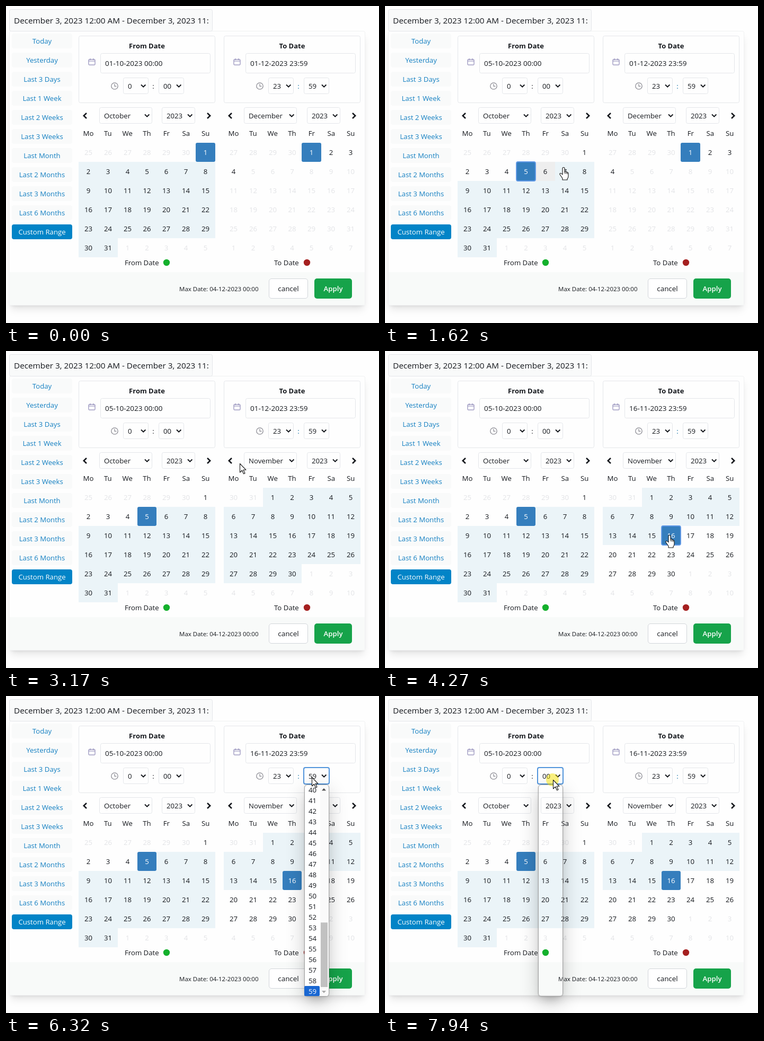
Animation, 704 px wide and 598 px high, one loop 8000 ms. Source, as an HTML page:

```html
<!DOCTYPE html>
<html lang="en">
<head>
<meta charset="utf-8">
<title>Date range picker</title>
<style>
  html, body { margin: 0; width: 100%; height: 100%; overflow: hidden; background: #fefefe; }
  svg, div { position: absolute; box-sizing: border-box; }
  svg { left: 0; top: 0; }
  text { font-family: "Open Sans", "Noto Sans", sans-serif; white-space: pre; }
  #panel {
    left: 6px; top: 47px; width: 672px; height: 518px; background: #fefefe;
    border: 1px solid #f1f2f3; border-radius: 3px;
    box-shadow: 0 10px 15px -3px rgba(0,0,0,.1), 0 4px 6px -4px rgba(0,0,0,.12);
  }
  #menu {
    top: 167px; width: 47px; height: 400px; border: 1px solid #a5a5a5; border-radius: 6px;
    box-shadow: 0 12px 36px rgba(0,0,0,.2), 0 12px 18px -8px rgba(0,0,0,.16), 0 0 2px rgba(0,0,0,.25);
  }
</style>
</head>
<body>
<div id="panel"></div>
<svg id="app" width="704" height="598"></svg>
<div id="menu"></div>
<svg id="overlay" width="704" height="598"></svg>
<script>
const LOOP = 8000, STEP = 77, CELL = 258 / 7, RIGHT = 274;
const INK = '#15181d', LINE = '#e4e6ea', BLUE = '#0284c7';
const OCT = 9, NOV = 10, DEC = 11;
const day = (month, date) => Date.UTC(2023, month, date) / 864e5;
const MAX_DAY = day(DEC, 4);
const pad = n => String(n).padStart(2, '0');

// Pointer moves: start, end, number of steps, evenly timed path points.
const moves = [
  [310, 847, 8, [[646, 270], [520, 285], [390, 300], [300, 312], [274, 313]]],
  [1620, 2470, 12, [[337, 304], [420, 262], [497, 225], [480, 212], [431, 205]]],
  [3170, 3720, 8, [[441, 212], [470, 250], [510, 310], [532, 340], [537, 347]]],
  [4820, 5610, 11, [[538, 335], [545, 270], [560, 190], [573, 150], [575, 158]]],
  [6320, 6780, 7, [[577, 153], [550, 161], [524, 154], [518, 152]]],
  [7480, 7863, 6, [[500, 153], [410, 160], [335, 161], [317, 158]]]
];
// Click highlights: start, end.
const clicks = [[923, 1000], [2620, 2700], [4040, 4193], [5680, 5750], [6920, 7010], [7940, LOOP]];

function pointerAt(t) {
  const move = moves.filter(m => m[0] <= t).pop();
  if (!move) return null;
  const [start, end, steps, path] = move;
  const step = Math.min(steps - 1, Math.floor((t - start) / (end - start) * (steps - 1) + 1e-6));
  const u = step / (steps - 1) * (path.length - 1);
  const i = Math.min(path.length - 2, Math.floor(u));
  return path[i].map((v, k) => v + (path[i + 1][k] - v) * (u - i));
}

function stateAt(t) {
  return {
    from: day(OCT, t < 923 ? 1 : 5),
    to: t < 4040 ? day(DEC, 1) : day(NOV, 16),
    rightMonth: t < 2620 ? DEC : NOV,
    focus: t >= 923 && t < 2620 ? day(OCT, 5) : t >= 4040 && t < 5680 ? day(NOV, 16) : 0,
    menu: t < 5680 ? null
      : t < 6920 ? { x: 562, count: 60, blank: t < 5750 }
      : t < 7940 ? { x: 495, count: 24 }
      : { x: 288, count: 60, blank: true }
  };
}

const rect = (x, y, w, h, fill, r = 0, more = '') =>
  `<rect x="${x}" y="${y}" width="${w}" height="${h}" rx="${r}" fill="${fill}" ${more}/>`;
const frame = (x, y, w, h, fill = '#fefefe', stroke = LINE) =>
  rect(x + .5, y + .5, w - 1, h - 1, fill, 3, `stroke="${stroke}"`);
const text = (s, x, y, { size = 13.2, fill = INK, weight = 400, anchor = 'start' } = {}) =>
  `<text x="${x}" y="${y}" font-size="${size}" fill="${fill}" font-weight="${weight}" text-anchor="${anchor}">${s}</text>`;
const centered = (s, x, y, style) => text(s, x, y, { ...style, anchor: 'middle' });
const line = (d, stroke = INK, width = 2) =>
  `<path d="${d}" fill="none" stroke="${stroke}" stroke-width="${width}"/>`;
const dot = (x, y, r, fill) => `<circle cx="${x}" cy="${y}" r="${r}" fill="${fill}"/>`;

const select = (x, y, w, label) =>
  frame(x, y, w, 31) + text(label, x + 9, y + 21) + line(`M${x + w - 14} ${y + 13.5}l4.2 4.2 4.2-4.2`);

function dateBox(x, title, value, hour, minute, colon) {
  return frame(x, 56, 258, 127) +
    centered(title, x + 129, 80, { size: 13, weight: 700 }) +
    `<rect x="${x + 19}" y="100.8" width="12" height="10.4" rx="1.5" fill="none" stroke="#8f8ab8" stroke-width="1.2"/>` +
    line(`M${x + 19} 104h12M${x + 22} 99v3M${x + 28} 99v3`, '#8f8ab8', 1.2) +
    frame(x + 41, 89, 208, 38) + text(value, x + 50, 113, { size: 13.5 }) +
    `<circle cx="${x + 68}" cy="151" r="6.2" fill="none" stroke="#8b8b93" stroke-width="1.3"/>` +
    line(`M${x + 68} 147v4.3h3.5`, '#8b8b93', 1.2) +
    select(x + 84, 135, 48, hour) + centered(':', x + 141, 156, { fill: colon }) +
    select(x + 151, 135, 48, minute);
}

function calendar(x, monthX, month, state, hover) {
  const names = { [OCT]: 'October', [NOV]: 'November', [DEC]: 'December' };
  let out = line(`M${x + 15} 202l-5.2 5 5.2 5`, INK, 2.6) + line(`M${x + 243} 202l5.2 5-5.2 5`, INK, 2.6) +
    select(monthX, 191, 100, names[month]) + select(x + 157, 191, 63, 2023);
  ['Mo', 'Tu', 'We', 'Th', 'Fr', 'Sa', 'Su'].forEach((s, i) => out += centered(s, x + CELL * (i + .5), 245));

  let ring = '';
  eachDay(x, month, ({ n, date, left, top, width, enabled, inMonth }) => {
    const active = inMonth && (n === state.from || n === state.to);
    const over = hover && enabled && inside(hover, left, top, width, 36);
    const inRange = inMonth && n >= state.from && n <= state.to;
    const fill = active ? '#357ebd' : over ? '#eeeeee' : inRange ? '#ebf4f8' : '';
    if (fill) out += rect(left, top, width, 36, fill, active ? 3 : 0);
    if (active && n === state.focus)
      ring = rect(left, top, width, 36, 'none', 3, 'stroke="#5f98e6" stroke-width="1.8"');
    out += centered(date, left + width / 2, top + 23, { fill: active ? '#fff' : enabled ? INK : '#e2e3e6' });
  });
  return out + ring;
}

const inside = ([px, py], x, y, w, h) => px >= x && px < x + w && py >= y && py < y + h;

function eachDay(x, month, visit) {
  const first = new Date(Date.UTC(2023, month, 1));
  const start = day(month, 1) - (first.getUTCDay() + 6) % 7;
  for (let i = 0; i < 42; i++) {
    const n = start + i, d = new Date(n * 864e5), inMonth = d.getUTCMonth() === month;
    const left = Math.round(x + i % 7 * CELL);
    visit({
      n, inMonth, date: d.getUTCDate(), enabled: inMonth && n <= MAX_DAY,
      left, width: Math.round(x + (i % 7 + 1) * CELL) - left, top: 258 + 36 * Math.floor(i / 7)
    });
  }
}

function presets() {
  const labels = ['Today', 'Yesterday', 'Last 3 Days', 'Last 1 Week', 'Last 2 Weeks', 'Last 3 Weeks',
    'Last Month', 'Last 2 Months', 'Last 3 Months', 'Last 6 Months', 'Custom Range'];
  return labels.map((label, i) => {
    const chosen = label === 'Custom Range';
    return rect(11, 52 + 36 * i, 114, 28, chosen ? BLUE : '#f9fafa', 4) +
      centered(label, 68, 71 + 36 * i, { fill: chosen ? '#fff' : '#1580c2' });
  }).join('');
}

function format(n, time) {
  const d = new Date(n * 864e5);
  return `${pad(d.getUTCDate())}-${pad(d.getUTCMonth() + 1)}-2023 ${time}`;
}

function drawApp(state, hover) {
  return frame(6, 6, 384, 42, '#f9fafa') +
    text('December 3, 2023 12:00 AM - December 3, 2023 11:', 15, 33, { size: 15.3 }) +
    presets() +
    dateBox(137, 'From Date', format(state.from, '00:00'), '0', '00', INK) +
    dateBox(137 + RIGHT, 'To Date', format(state.to, '23:59'), '23', '59', '#0369a1') +
    calendar(137, 176, OCT, state, hover) +
    calendar(137 + RIGHT, 449, state.rightMonth, state, hover) +
    text('From Date', 224, 489) + dot(303, 484, 6.2, '#14b02c') +
    text('To Date', 506, 489) + dot(568, 484, 6.2, '#a52020') +
    rect(7, 502, 670, 62, '#f8faf9') +
    text('Max Date: 04-12-2023 00:00', 327, 538, { size: 11.5 }) +
    rect(496.5, 514.5, 73, 37, '#fff', 4.5, 'stroke="#d2d5da"') +
    centered('cancel', 533, 538, { size: 13.4, weight: 500 }) +
    rect(582, 514, 71, 38, '#16a34a', 5) +
    centered('Apply', 617.5, 538, { fill: '#fff', weight: 600 }) +
    (state.menu ? rect(state.menu.x, 135, 48, 31, 'none', 3, 'stroke="#5295dc" stroke-width="2"') : '');
}

function drawMenu({ x, count, blank }) {
  if (blank) return '';
  const thumb = 365 * 20 / count, arrow = x + 38;
  let out = rect(x + 31, 168, 15, 398, '#fafafa', 3) +
    rect(x + 32, 549 - thumb, 13, thumb, '#c1c1c1') +
    `<path d="M${arrow - 4} 178.5h8l-4-4.5z" fill="#505050"/><path d="M${arrow - 4} 556h8l-4 4.5z" fill="#a8a8a8"/>` +
    rect(x + 1, 547, 29, 19, '#1967d2', 2);
  for (let i = 0; i < 20; i++)
    out += text(count - 20 + i, x + 9, 182 + 20 * i, { fill: i === 19 ? '#fff' : INK });
  return out;
}

const ARROW = 'M.5.5V17l4-3.8 3 6.6 2.5-1.1-3-6.4h5z';
const HAND = 'M-2 14V2Q-2 .5 0 .5T2 2V8q2-1.5 2.5 1 2-1 2.5 1.2 2-.5 2 1.8v5q0 3-2 5v2H-2V21l-4.5-6.5q-1.5-2.5.5-3 2-.3 4 2.5z';

function isOverLink(p, month) {
  let over = inside(p, 411, 195, 29, 24);
  [[137, OCT], [137 + RIGHT, month]].forEach(([x, m]) =>
    eachDay(x, m, d => over ||= d.enabled && inside(p, d.left, d.top, d.width, 36)));
  return over;
}

function drawPointer(p, hand, clicked) {
  const [x, y] = p.map(Math.round);
  return (clicked ? `<circle cx="${x - 1}" cy="${y}" r="12" fill="#f5e200" opacity=".5"/>` : '') +
    `<path transform="translate(${x} ${y})" d="${hand ? HAND : ARROW}" fill="#fff" stroke="#111" stroke-width="1.1" stroke-linejoin="round"/>` +
    (hand ? `<path transform="translate(${x} ${y})" d="M2 8v4M4.5 9v3.5M7 10.2v3" stroke="#111"/>` : '');
}

const byId = id => document.getElementById(id);
const app = byId('app'), menuBox = byId('menu'), overlay = byId('overlay');
const shown = new Map();
function update(node, markup) {
  if (shown.get(node) === markup) return;
  shown.set(node, markup);
  node.innerHTML = markup;
}

function render(t) {
  const state = stateAt(t), { menu } = state;
  const pointer = pointerAt(t), before = pointerAt(t - STEP) || pointer;
  // The hovered cell trails slightly behind the pointer.
  const hover = pointer && pointer.map((v, k) => (v + before[k]) / 2);

  update(app, drawApp(state, hover));
  menuBox.style.display = menu ? 'block' : 'none';
  if (menu) {
    menuBox.style.left = menu.x + .5 + 'px';
    menuBox.style.background = menu.blank ? 'none' : '#fff';
  }
  const clicked = clicks.some(([start, end]) => t >= start && t < end);
  update(overlay, (menu ? drawMenu(menu) : '') +
    (pointer ? drawPointer(pointer, isOverLink(pointer, state.rightMonth), clicked) : ''));
}

const began = performance.now();
function tick() {
  render((performance.now() - began) % LOOP);
  requestAnimationFrame(tick);
}
tick();
</script>
</body>
</html>
```
